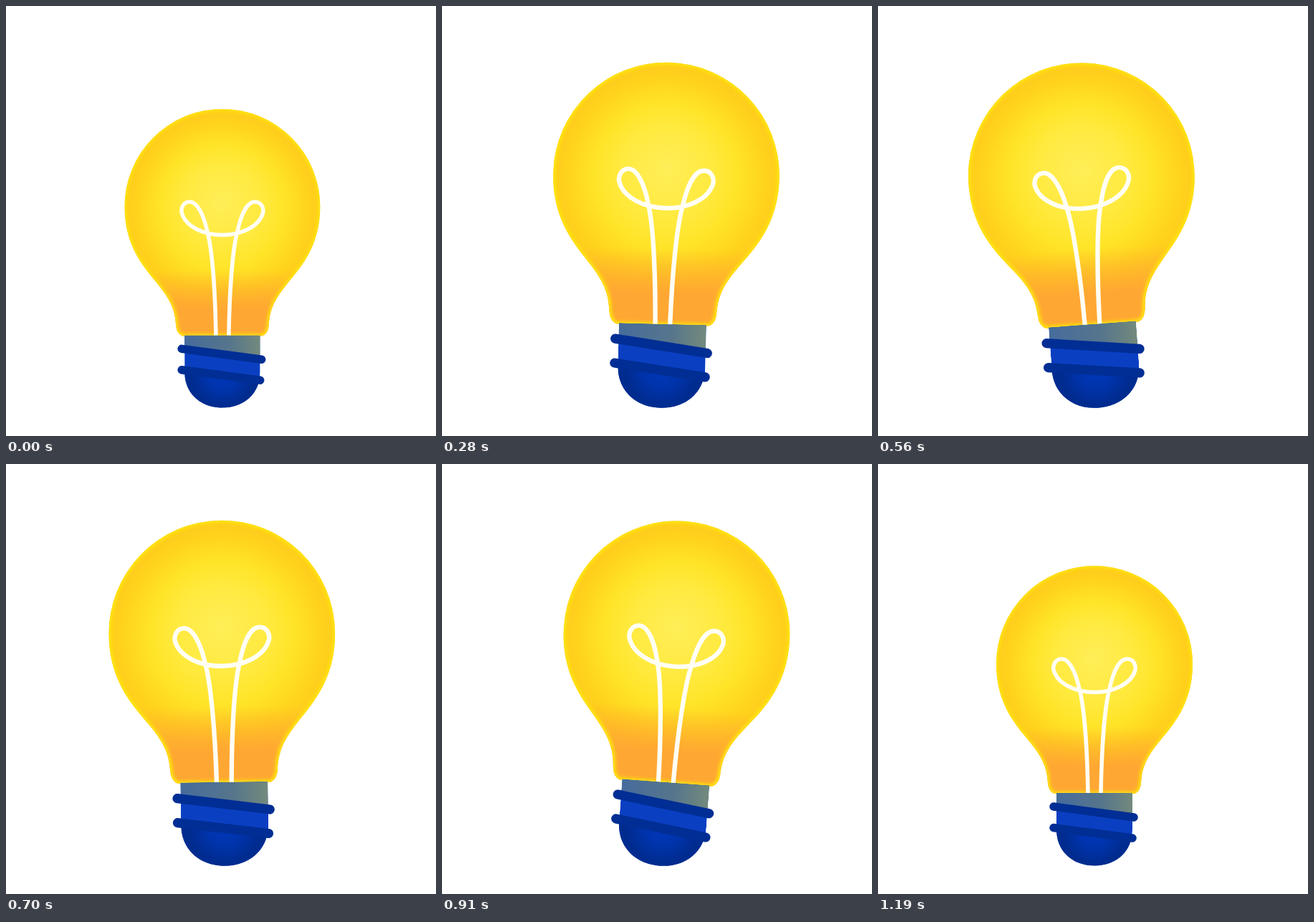
An HTML page for the animation above (1980 ms loop, 600 by 600 pixels).

```html
<!DOCTYPE html>
<html>
<head>
<meta charset="utf-8">
<style>
  html, body { margin: 0; width: 100%; height: 100%; overflow: hidden; background: #fff; }
  svg { display: block; width: 100%; height: 100%; }
</style>
</head>
<body>
<svg viewBox="0 0 600 600">
  <defs>
    <path id="glass" d="M246 460Q238 457 237 445C236 422 228 408 212 388C194 366 165 336 165 279A137 137 0 0 1 439 279C439 336 410 366 392 388C376 408 368 422 367 445Q366 457 358 460Z"/>
    <path id="socket" d="M249 459H355V510C355 541 332 560.5 302 560.5C272 560.5 249 541 249 510Z"/>
    <clipPath id="inGlass"><use href="#glass"/></clipPath>
    <clipPath id="inSocket"><use href="#socket"/></clipPath>
    <radialGradient id="glow" gradientUnits="userSpaceOnUse" cx="302" cy="285" r="150" fy="270">
      <stop offset="0" stop-color="#ffee58"/>
      <stop offset=".36" stop-color="#ffea40"/>
      <stop offset=".58" stop-color="#ffe428"/>
      <stop offset=".8" stop-color="#ffd31c"/>
      <stop offset="1" stop-color="#ffc61e"/>
    </radialGradient>
    <linearGradient id="neck" gradientUnits="userSpaceOnUse" x1="0" y1="368" x2="0" y2="422">
      <stop offset="0" stop-color="#ffa733" stop-opacity="0"/>
      <stop offset="1" stop-color="#ffa733"/>
    </linearGradient>
    <linearGradient id="strip">
      <stop offset="0" stop-color="#466c9c"/>
      <stop offset=".6" stop-color="#56758c"/>
      <stop offset="1" stop-color="#738a7c"/>
    </linearGradient>
    <radialGradient id="tip" gradientUnits="userSpaceOnUse" cx="302" cy="514" r="50">
      <stop offset="0" stop-color="#0036b8"/>
      <stop offset=".4" stop-color="#0034ae"/>
      <stop offset=".85" stop-color="#002c90"/>
    </radialGradient>
    <filter id="soft"><feGaussianBlur stdDeviation="2"/></filter>
  </defs>
  <g id="bulb">
    <use href="#glass" fill="url(#glow)"/>
    <g clip-path="url(#inGlass)">
      <rect x="160" y="360" width="290" height="105" fill="url(#neck)"/>
      <use href="#glass" fill="none" stroke="#ffe40c" stroke-width="6" filter="url(#soft)"/>
    </g>
    <g clip-path="url(#inSocket)">
      <use href="#socket" fill="#0a3fc2"/>
      <path d="M249 459H355V488L249 476Z" fill="url(#strip)"/>
      <path d="M249 508L355 522V562H249Z" fill="url(#tip)"/>
    </g>
    <path d="M245 478L357 493M245 507.5L355 522" stroke="#002e94" stroke-width="11.5" stroke-linecap="round"/>
    <path d="M293 459C292 400 288 340 281 314C275 286 265 272 256.500 272C247 272 244 281 245 287C250 307 276 318.500 302 318.500C328 318.500 354 307 359 287C360 281 357 272 347.500 272C338 272 329 286 323 314C316 340 312 400 311 459" fill="none" stroke="#fffef4" stroke-width="5.500"/>
  </g>
</svg>
<script>
  const LOOP = 1980, STEP = 70, TILT = 4.2, BIG = 1.152;
  // time, angle, scale
  const keys = [
    [0, 0, 0.996], [140, -TILT, BIG], [350, TILT, BIG],
    [560, -TILT, BIG], [910, TILT, BIG], [1190, 0, 1], [LOOP, 0, 1]
  ];
  const bulb = document.getElementById('bulb');

  function pose(t) {
    const i = keys.findIndex(k => k[0] > t);
    const a = keys[i - 1], b = keys[i];
    const p = (t - a[0]) / (b[0] - a[0]);
    return [1, 2].map(n => a[n] + (b[n] - a[n]) * p);
  }

  function draw(now) {
    const t = Math.floor((now - start) % LOOP / STEP) * STEP;
    const [angle, scale] = pose(Math.max(0, t));
    bulb.setAttribute('transform',
      `translate(278 559) scale(${scale}) translate(-278 -559) rotate(${angle} 302 538)`);
    requestAnimationFrame(draw);
  }

  const start = performance.now();
  draw(start);
</script>
</body>
</html>
```
